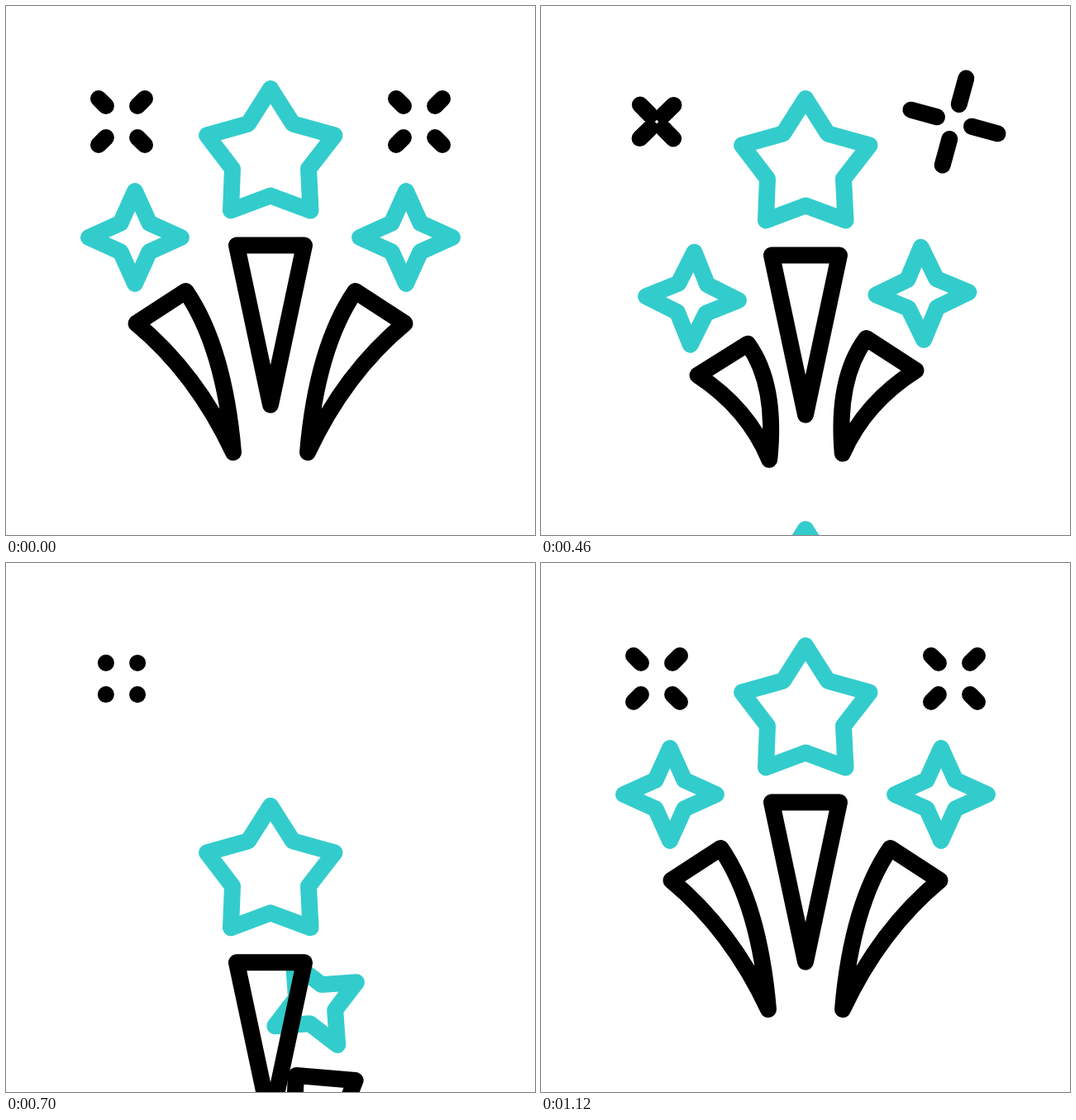
An HTML page with a canvas for the animation above (1800 ms loop, 640x640 px).

```html
<!DOCTYPE html>
<html lang="en">
<head>
<meta charset="utf-8">
<title>Fireworks</title>
<style>
  html, body { margin: 0; width: 100%; height: 100%; overflow: hidden; background: #fff; }
  canvas { display: block; width: 100vmin; height: 100vmin; }
</style>
</head>
<body>
<canvas id="stage"></canvas>
<script>
const SIZE = 640, LOOP = 1800;
const TEAL = '#33cccc', BLACK = '#000';
const PIVOT = [-293, 624];   // centre of the arc the side rockets fly along
const WINDUP = 396;

const canvas = document.getElementById('stage');
const ctx = canvas.getContext('2d');
const dpr = window.devicePixelRatio || 1;
canvas.width = canvas.height = SIZE * dpr;

const rad = deg => deg * Math.PI / 180;
const ramp = (t, start, dur) => Math.min(1, Math.max(0, (t - start) / dur));
const ease = (t, start, dur) => {
  const x = ramp(t, start, dur);
  return x * x * (3 - 2 * x);
};

const bigStar = [
  [320, 100], [347, 142.5], [397.5, 156.5], [366, 197], [368.5, 247.5],
  [320, 229.5], [272, 247.5], [274, 197], [243, 156.5], [293, 142.5]
];
const smallStar = Array.from({ length: 8 }, (_, i) => {
  const r = i % 2 ? 24.6 : 56, a = i * Math.PI / 4;
  return [r * Math.sin(a), -r * Math.cos(a)];
});

function outline(points, color) {
  ctx.beginPath();
  points.forEach(p => ctx.lineTo(...p));
  ctx.closePath();
  ctx.strokeStyle = color;
  ctx.stroke();
}

function swing([x, y], deg) {
  const c = Math.cos(rad(deg)), s = Math.sin(rad(deg));
  const dx = x - PIVOT[0], dy = y - PIVOT[1];
  return [PIVOT[0] + dx * c - dy * s, PIVOT[1] + dx * s + dy * c];
}

function mirrored(flip, draw) {
  ctx.save();
  if (flip) { ctx.translate(SIZE, 0); ctx.scale(-1, 1); }
  draw();
  ctx.restore();
}

function sideStar({ deg, squash }) {
  const [x, y] = swing([156, 280], deg);
  ctx.save();
  ctx.translate(x + 11.9 * squash, y + 36.5 * squash);
  ctx.rotate(rad(deg + 0.85 * squash));
  outline(smallStar, TEAL);
  ctx.restore();
}

function sideTail({ deg, squash }) {
  const at = (x, y, weight) => {
    const p = swing([x, y], deg), k = squash * weight;
    return [p[0] + 15.5 * k, p[1] + 30.5 * k];
  };
  const tip = at(275, 540, 0);
  ctx.beginPath();
  ctx.moveTo(...at(157.5, 384, 1));
  ctx.lineTo(...at(217.5, 345, 1));
  ctx.quadraticCurveTo(...at(264, 413, 0.65), ...tip);
  ctx.quadraticCurveTo(...at(230, 444, 0.62), ...at(157.5, 384, 1));
  ctx.closePath();
  ctx.strokeStyle = BLACK;
  ctx.stroke();
}

function shifted(dy, draw) {
  ctx.save();
  ctx.translate(0, dy);
  draw();
  ctx.restore();
}

function sparkle(cx, t, { grow, fold, back, backDur }) {
  let deg, inner, outer;
  if (t < back) {
    const g = ease(t, grow, 176), f = ramp(t, fold, 207) ** 2;
    if (f === 1) return;
    deg = 45 - 45 * g + 79 * f;
    inner = 27 * (1 - f);
    outer = (39.6 + 27.9 * g) * (1 - f);
  } else {
    const g = ease(t, back, backDur);
    if (g === 0) return;
    deg = -45 + 90 * g;
    inner = 27;
    outer = 27 + 12.6 * g;
  }
  ctx.save();
  ctx.translate(cx, 140);
  ctx.rotate(rad(deg));
  ctx.strokeStyle = BLACK;
  for (let i = 0; i < 4; i++) {
    ctx.beginPath();
    ctx.moveTo(0, -inner);
    ctx.lineTo(0, -outer);
    ctx.stroke();
    ctx.rotate(Math.PI / 2);
  }
  ctx.restore();
}

// The leaving rocket and the one that replaces it.
function sideRockets(t, { launchDur, enter, enterDur }) {
  const wind = ease(t, 0, WINDUP);
  return [
    {
      deg: 7.6 * wind - 87.6 * ease(t, WINDUP, launchDur),
      squash: 2.3 * wind * (1 - ease(t, WINDUP, 223))
    },
    { deg: 62 * (1 - ease(t, enter, enterDur)), squash: 0 }
  ];
}

function draw(t) {
  ctx.setTransform(canvas.width / SIZE, 0, 0, canvas.height / SIZE, 0, 0);
  ctx.fillStyle = '#fff';
  ctx.fillRect(0, 0, SIZE, SIZE);
  ctx.lineWidth = 20;
  ctx.lineCap = ctx.lineJoin = 'round';

  const sides = [
    [false, sideRockets(t, { launchDur: 383, enter: 538, enterDur: 580 })],
    [true, sideRockets(t, { launchDur: 362, enter: 377, enterDur: 612 })]
  ];
  const middle = [
    68 * ease(t, 0, WINDUP) - 668 * ease(t, WINDUP, 365),
    600 * (1 - ease(t, 340, 582))
  ];

  for (const [flip, rockets] of sides) mirrored(flip, () => rockets.forEach(sideStar));
  for (const dy of middle) {
    shifted(dy, () => {
      outline(bigStar, TEAL);
      outline([[279, 289.5], [361, 289.5], [320, 482.5]], BLACK);
    });
  }
  for (const [flip, rockets] of sides) mirrored(flip, () => rockets.forEach(sideTail));

  sparkle(140, t, { grow: 42, fold: 304, back: 696, backDur: 260 });
  sparkle(500, t, { grow: 108, fold: 370, back: 718, backDur: 366 });
}

const began = performance.now();
function tick() {
  draw((performance.now() - began) % LOOP);
  requestAnimationFrame(tick);
}
tick();
</script>
</body>
</html>
```
